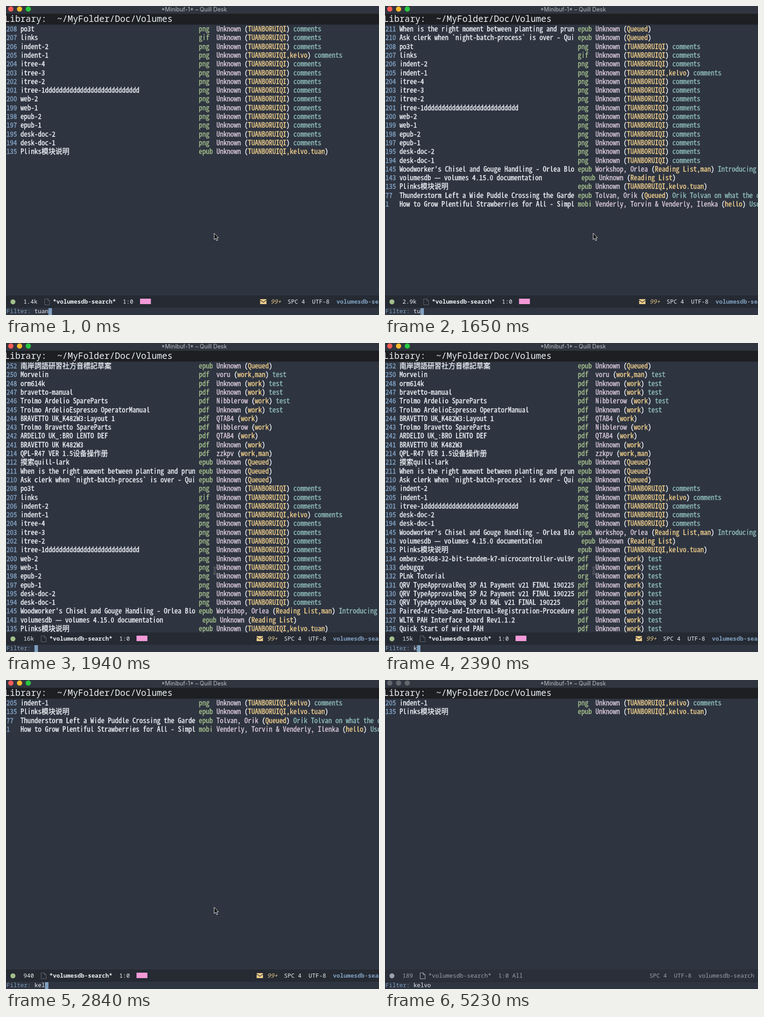
Recreate the animation shown at these times as an HTML page with a canvas. Size 823 by 681 pixels, loop 5330 ms.

```html
<!DOCTYPE html>
<html lang="en">
<head>
<meta charset="utf-8">
<title>Library filter</title>
<style>
  html, body { margin: 0; width: 100%; height: 100%; overflow: hidden; background: #2e3440; }
  canvas { display: block; }
</style>
</head>
<body>
<canvas id="stage" width="823" height="681"></canvas>
<script>
const ctx = document.getElementById('stage').getContext('2d');
const LOOP = 5330, CELL = 7.72, LEFT = 1, ROW = 19.3, MAX_ROWS = 31;
const C = {
  bg: '#2e3440', header: '#1d1f22', bar: '#252a33', barOff: '#2a2f3a', text: '#eceff4', blue: '#81a1c1',
  green: '#a3be8c', mauve: '#d9c8d8', yellow: '#ebcb8b', teal: '#8fbcbb', grey: '#9aa1ae'
};

// id | title | format | author | tags | comment
const books = {};
`252|南岸詞語研習社方音標記草案|epub|Unknown|Queued
250|Morvelin|pdf|voru|work,man|test
248|orm614k|pdf|Unknown|work|test
247|bravetto-manual|pdf|Unknown|work|test
246|Trolmo Ardelio SpareParts|pdf|Nibblerow|work|test
245|Trolmo ArdelioEspresso OperatorManual|pdf|Unknown|work|test
244|BRAVETTO UK_K482W3:Layout 1|pdf|QTAB4|work
243|Trolmo Bravetto SpareParts|pdf|Nibblerow|work
242|ARDELIO UK_:BRO LENTO DEF|pdf|QTAB4|work
241|BRAVETTO UK K482W3|pdf|Unknown|work
214|QPL-R47 VER 1.5设备操作册|pdf|zzkpv|work,man
212|摸索quill-lark|epub|Unknown|Queued
211|When is the right moment between planting and prun|epub|Unknown|Queued
210|Ask clerk when \`night-batch-process\` is over - Qui|epub|Unknown|Queued
208|po3t
207|links|gif
206|indent-2
205|indent-1|png|Unknown|TUANBORUIQI,kelvo|comments
204|itree-4
203|itree-3
202|itree-2
201|itree-1${'d'.repeat(27)}
200|web-2
199|web-1
198|epub-2
197|epub-1
195|desk-doc-2
194|desk-doc-1
145|Woodworker's Chisel and Gouge Handling - Orlea Blo|epub|Workshop, Orlea|Reading List,man|Introducing
143|volumesdb — volumes 4.15.0 documentation|epub|Unknown|Reading List
135|Plinks模块说明|epub|Unknown|TUANBORUIQI,kelvo.tuan
134|ombex-20468-32-bit-tandem-k7-microcontroller-vul9r|pdf|Unknown|work|test
133|debugqx|pdf|Unknown|work|test
132|PLnk Totorial|org|Unknown|work|test
131|QRV TypeApprovalReq SP A1 Payment v21 FINAL 190225|pdf|Unknown|work|test
130|QRV TypeApprovalReq SP A2 Payment v21 FINAL 190225|pdf|Unknown|work|test
129|QRV TypeApprovalReq SP A3 RWL v21 FINAL 190225|pdf|Unknown|work|test
128|Paired-Arc-Hub-and-Internal-Registration-Procedure|pdf|Unknown|work|test
127|WLTK PAH Interface board Rev1.1.2|pdf|Unknown|work|test
126|Quick Start of wired PAH|pdf|Unknown|work|test
77|Thunderstorm Left a Wide Puddle Crossing the Garde|epub|Tolvan, Orik|Queued|Orik Tolvan on what the cloud left
1|How to Grow Plentiful Strawberries for All - Simpl|mobi|Venderly, Torvin & Venderly, Ilenka|hello|Use a pot`
  .split('\n').forEach(line => {
    const [id, title, format = 'png', author = 'Unknown', tags, comment = ''] = line.split('|');
    books[id] = { id, title, format, author, tags: tags ?? 'TUANBORUIQI', comment: tags ? comment : 'comments' };
  });

const ids = Object.keys(books).map(Number).sort((a, b) => b - a);
const between = (high, low) => ids.filter(id => id <= high && id >= low);
const pictures = between(208, 194);
const plainPictures = [208, 207, 204, 203, 202, 200, 199, 198, 197];

// start time, typed filter, size shown, visible ids
const steps = [
  [0, 'tuan', '1.4k', [...pictures, 135]],
  [1500, 'tua', '1.4k', [...pictures, 135]],
  [1650, 'tu', '2.9k', [211, 210, ...pictures, 145, 143, 135, 77, 1]],
  [1790, 't', '13k', [250, ...between(247, 241), ...between(212, 133), 131]],
  [1940, '', '16k', ids],
  [2390, 'k', '15k', ids.filter(id => !plainPictures.includes(id))],
  [2540, 'ke', '2.1k', [205, 195, 194, 145, 135, 77, 1]],
  [2840, 'kel', '940', [205, 135, 77, 1]],
  [3140, 'kelv', '189', [205, 135]],
  [3440, 'kelvo', '189', [205, 135]]
];

const MONO = '"Noto Sans Mono", "DejaVu Sans Mono", monospace';
const NARROW = '"Noto Sans Mono CJK SC", "Noto Sans Mono", "Noto Sans CJK SC", monospace';

// Font whose character advance equals one grid cell
function gridFont(family, cell, style = '') {
  ctx.font = `100px ${family}`;
  const size = 100 * cell / ctx.measureText('0').width;
  return `${style} ${size}px ${family}`;
}
const fonts = {
  list: gridFont(NARROW, CELL),
  bar: gridFont(MONO, CELL),
  bold: gridFont(MONO, CELL, 'bold'),
  italic: gridFont(MONO, CELL, 'italic'),
  header: gridFont(MONO, CELL * 1.5),
  title: '12.6px Inter, "Open Sans", sans-serif'
};

function rect(x, y, w, h, color) {
  ctx.fillStyle = color;
  ctx.fillRect(x, y, w, h);
}
function dot(x, y, r, color) {
  ctx.fillStyle = color;
  ctx.beginPath();
  ctx.arc(x, y, r, 0, 2 * Math.PI);
  ctx.fill();
}
function write(text, x, y, color, font) {
  ctx.font = font;
  ctx.fillStyle = color;
  ctx.fillText(text, x, y);
}
// A thin outline gives the list its medium weight
function writeMedium(text, x, y, color, font) {
  write(text, x, y, color, font);
  ctx.strokeStyle = color;
  ctx.lineWidth = 0.4;
  ctx.strokeText(text, x, y);
}
function line(points, color, width) {
  ctx.strokeStyle = color;
  ctx.lineWidth = width;
  ctx.beginPath();
  points.forEach(([x, y]) => ctx.lineTo(x, y));
  ctx.stroke();
}

function drawTop(active) {
  rect(0, 0, 823, 17, '#30353f');
  rect(0, 17, 823, 24, C.header);
  ['#fc5b57', '#fdbb2d', '#28c840'].forEach((color, i) => dot(10.6 + ROW * i, 6.7, 5.8, active ? color : '#63666b'));
  ctx.textAlign = 'center';
  write('*Minibuf-1* – Quill Desk', 415, 11.5, '#b9bcc2', fonts.title);
  ctx.textAlign = 'left';
  write('Library:  ~/MyFolder/Doc/Volumes', -3, 35, C.text, fonts.header);
}

function drawBook(book, row) {
  const y = 56 + ROW * row;
  let column = 0;
  const put = (text, color) => {
    writeMedium(text, LEFT + column * CELL, y, color, fonts.list);
    column += text.length;
  };
  put(book.id.padEnd(4), C.blue);
  put(book.title, C.text);
  column = book.title.includes('—') ? 56 : 55; // the long dash fills two cells
  put(book.format.padEnd(5), C.green);
  put(book.author + ' ', C.mauve);
  put('(', C.text);
  put(book.tags, C.yellow);
  put(') ', C.text);
  put(book.comment, C.teal);
}

function drawFileIcon(x, color) {
  line([[x + 8, 645.5], [x + .5, 645.5], [x + .5, 658.5], [x + 11.5, 658.5], [x + 11.5, 649.5],
    [x + 7.5, 645.5], [x + 7.5, 649.5], [x + 11.5, 649.5]], color, 1);
}

function drawModeLine(size, active) {
  const shift = (size.length - 3) * CELL, y = 656;
  const main = active ? C.text : C.grey;
  const put = (text, x, color = main, font = fonts.bar) => write(text, x + shift, y, color, font);
  rect(0, 638, 823, 27, active ? C.bar : C.barOff);
  if (!active) rect(0, 664, 823, 1, '#21252d');
  dot(15.3, 652, 5.5, active ? C.green : C.grey);
  write(size, 38.6, y, main, fonts.bar);
  drawFileIcon(77 + shift, active ? '#656b76' : '#b4bac5');
  put('*volumesdb-search*', 95.8, main, active ? fonts.bold : fonts.bar);
  put(active ? '1:0' : '1:0 All', 250);
  if (active) {
    rect(288 + shift, 645, 24, 12, '#f29ad8');
    rect(553 + shift, 646, 14, 11, C.yellow);
    line([[553 + shift, 648], [560 + shift, 653], [567 + shift, 648]], C.bar, 1.2);
    put('99+', 576, C.yellow, fonts.italic);
  }
  const right = active ? 613.5 : 583.5;
  put('SPC 4', right);
  put('UTF-8', right + 7 * CELL);
  put('volumesdb-search', right + 14 * CELL, active ? C.blue : C.grey, active ? fonts.bold : fonts.bar);
}

function drawPrompt(filter, active) {
  rect(0, 665, 823, 16, C.bg);
  write('Filter:', LEFT, 677, C.blue, fonts.bar);
  write(filter, LEFT + 8 * CELL, 677, C.text, fonts.bar);
  if (active) rect(LEFT + (8 + filter.length) * CELL, 666, CELL, 15, C.blue);
}

function drawArrow(x, y) {
  ctx.beginPath();
  [[0, 0], [0, 14], [3.2, 11], [5.4, 16.2], [7.8, 15.2], [5.6, 10.2], [9.6, 10]]
    .forEach(([dx, dy]) => ctx.lineTo(x + dx, y + dy));
  ctx.closePath();
  ctx.fillStyle = '#0b0c0e';
  ctx.fill();
  ctx.strokeStyle = '#f4f5f7';
  ctx.lineWidth = 1;
  ctx.stroke();
}
function drawBeam(x, y) {
  for (const [color, width] of [['#a9adb5', 2.2], ['#14161a', 1.1]]) {
    line([[x, y - 7], [x, y + 7]], color, width);
    for (const side of [-1, 1]) line([[x - 3, y + 8 * side], [x, y + 7 * side], [x + 3, y + 8 * side]], color, width);
    line([[x - 2, y + 3], [x + 2, y + 3]], color, width);
  }
}
function drawPointer(t, rows) {
  if (t >= 4190) return;
  if (t >= 4040) drawArrow(634, 565);
  else if (rows > 23) drawBeam(460.5, 502); // text lies under the pointer
  else drawArrow(459.3, 500.8);
}

const began = performance.now();
function frame() {
  const t = (performance.now() - began) % LOOP, active = t < 5230;
  const [, filter, size, visible] = steps.findLast(([start]) => start <= t);
  rect(0, 0, 823, 681, C.bg);
  drawTop(active);
  visible.slice(0, MAX_ROWS).forEach((id, row) => drawBook(books[id], row));
  drawModeLine(size, active);
  drawPrompt(filter, active);
  drawPointer(t, visible.length);
  requestAnimationFrame(frame);
}
frame();
</script>
</body>
</html>
```
